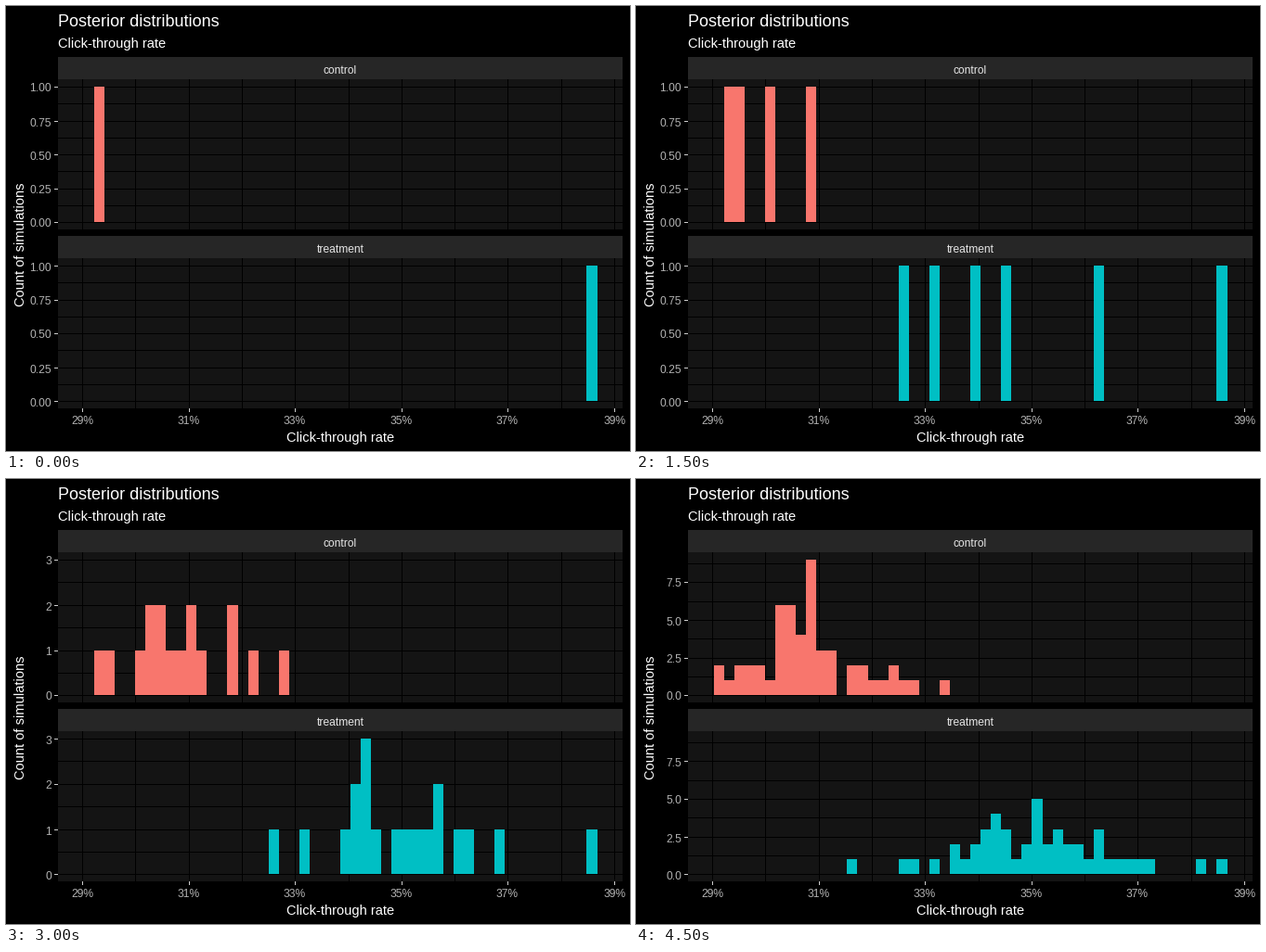
Write a matplotlib script that moves like this. It is 672 px wide and 480 px high and loops after 5 s.

```python
import matplotlib.pyplot as plt
from matplotlib.animation import FuncAnimation
from matplotlib.patches import Rectangle
import numpy as np

W, H, DPI = 672, 480, 100
STEP_MS = 500
LEFT, RIGHT = 56, 664
BIN_START, BIN_WIDTH, BINS = 83.7, 11.057, 50
BAR_SPAN = 146.5

plt.rcParams["font.family"] = "Liberation Sans"

# Bins hit by the new simulations at each step.
CONTROL = [
    [1], [5], [], [2, 9], [7, 8, 10], [7, 14, 14, 19], [6, 6, 10, 11, 16],
    [0, 3, 4, 7, 8, 8, 9, 9, 9, 17],
    [0, 2, 3, 4, 7, 8, 10, 13, 17, 22],
    [6] * 4 + [7] * 2 + [9] * 5 + [11, 11, 13, 15, 18],
]
TREATMENT = [
    [49], [21], [37], [18, 25, 28], [26, 30, 40], [27, 31, 32, 33],
    [26, 27, 27, 34, 34, 36],
    [19, 24, 29, 35, 41, 42, 47],
    [25, 30, 32, 35, 37, 38, 39],
    [13, 23, 23, 26, 27, 28, 28] + [31] * 4 + [33, 33, 37],
]
PANELS = [
    ("control", CONTROL, "#F8766D", 55),
    ("treatment", TREATMENT, "#00BFC4", 248),
]

fig = plt.figure(figsize=(W / DPI, H / DPI), dpi=DPI, facecolor="black")
ax = fig.add_axes([0, 0, 1, 1])


def box(x0, y0, x1, y1, color):
    ax.add_patch(Rectangle((x0, y0), x1 - x0, y1 - y0, facecolor=color,
                           linewidth=0, antialiased=False))


def label(x, y, text, px, color="white", ha="left", **kw):
    ax.text(x, y, text, fontsize=px * 72 / DPI, color=color, ha=ha,
            va="baseline", **kw)


def px(v):
    return int(np.floor(v + 0.5))


def counts(steps, n):
    hits = [b for step in steps[:n + 1] for b in step]
    return np.bincount(hits, minlength=BINS)


def y_step(top):
    """Spacing of the major breaks and the label format."""
    if top <= 1:
        return 0.25, "{:.2f}"
    if top <= 2:
        return 0.5, "{:.1f}"
    if top <= 4:
        return 1, "{:.0f}"
    return 2.5, "{:.1f}"


def rate_x(pct):
    return px(82 + 57.3 * (pct - 29))


def draw_panel(name, bars, color, y, top):
    zero = y + 178.4
    row = lambda v: px(zero - v * BAR_SPAN / top)
    box(LEFT, y, RIGHT, y + 24, "#262626")
    label(360, y + 18, name, 12, "#E5E5E5", "center")
    box(LEFT, y + 24, RIGHT, y + 186, "#141414")

    for pct in range(29, 40):
        x = rate_x(pct)
        box(x, y + 24, x + 1, y + 186, "black")
    step, fmt = y_step(top)
    for k in range(int(top * 1.05 / step * 2) + 1):
        v = k * step / 2
        r = row(v)
        box(LEFT, r, RIGHT, r + 1, "black")
        if k % 2 == 0:
            box(LEFT - 4, r, LEFT, r + 1, "#CCCCCC")
            label(49, r + 5.5, fmt.format(v), 12, "#B3B3B3", "right")

    for i, n in enumerate(bars):
        if n:
            box(px(BIN_START + i * BIN_WIDTH), row(n),
                px(BIN_START + (i + 1) * BIN_WIDTH), row(0), color)


def draw(n):
    ax.clear()
    ax.set_axis_off()
    ax.set_xlim(0, W)
    ax.set_ylim(H, 0)

    label(56, 22, "Posterior distributions", 18, weight="normal")
    label(56, 45, "Click-through rate", 14.67)
    label(360, 470, "Click-through rate", 14.67, ha="center")
    label(20, 257, "Count of simulations", 14.67, ha="center",
          rotation=90, rotation_mode="anchor")

    hists = [counts(steps, n) for _, steps, _, _ in PANELS]
    top = max(h.max() for h in hists)
    for (name, _, color, y), bars in zip(PANELS, hists):
        draw_panel(name, bars, color, y, top)
    for pct in range(29, 40, 2):
        x = rate_x(pct)
        box(x, 434, x + 1, 438, "#CCCCCC")
        label(x, 451, f"{pct}%", 12, "#B3B3B3", "center")


anim = FuncAnimation(fig, draw, frames=len(CONTROL), interval=STEP_MS,
                     init_func=lambda: None, repeat=True, repeat_delay=0)
plt.show()
```
